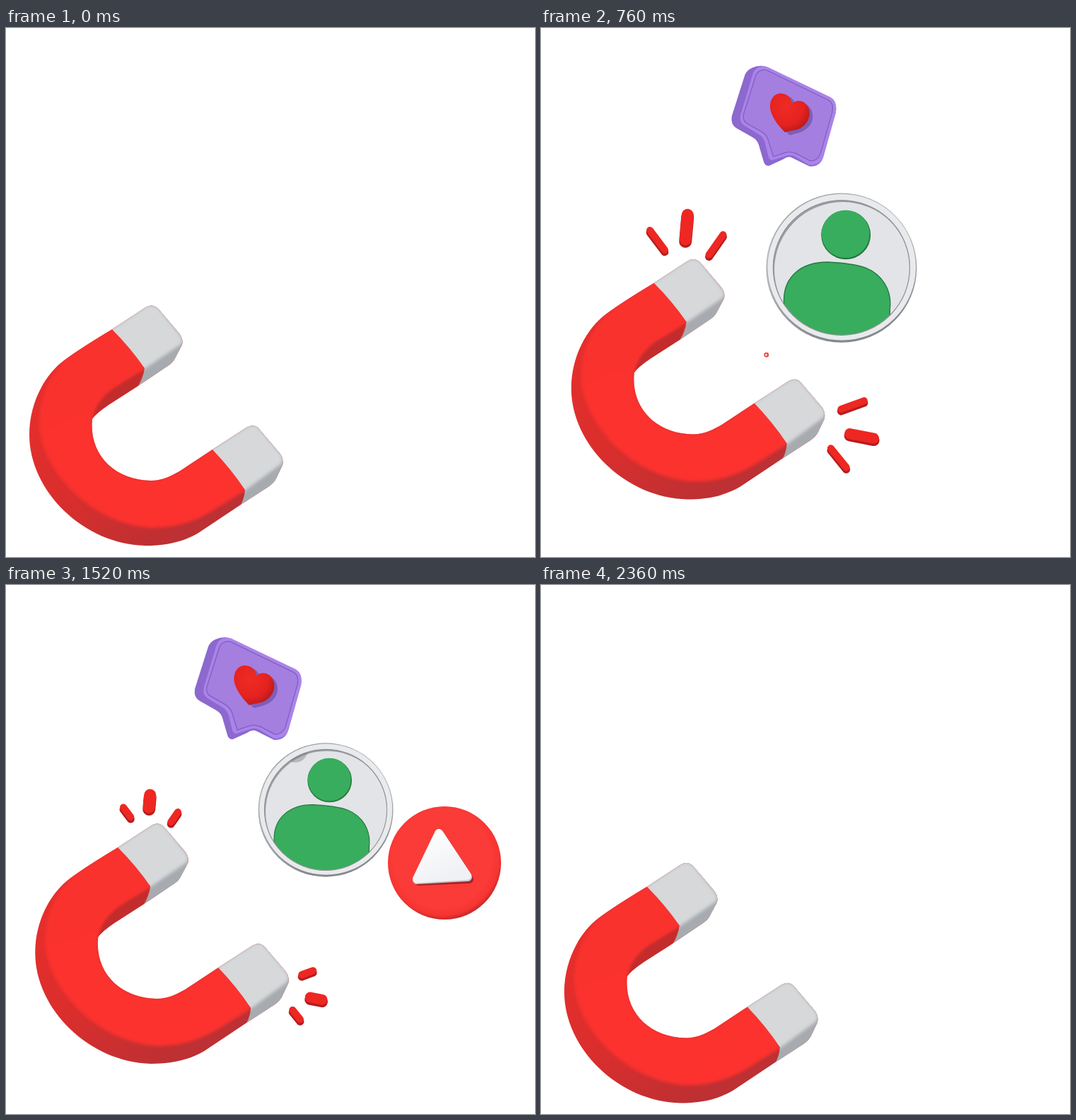
These frames come from a looping animation (748 px wide and 748 px high, 2400 ms). An HTML page:

```html
<!DOCTYPE html>
<html lang="en">
<head>
<meta charset="utf-8">
<title>Magnet</title>
<style>
  html, body { margin: 0; width: 100%; height: 100%; overflow: hidden; background: #fff; }
  svg { display: block; width: 100vw; height: 100vh; }
</style>
</head>
<body>
<svg viewBox="0 0 748 748">
  <defs>
    <path id="body" d="M206 392.5Q212 393 217 399L245 432Q251 440 249 448L239 467Q236 473 230 477L187 506L145 533Q127 545 122 553C117 602 152 639 205 640C222 640 234 633 245 627L292 596L340 565Q350 559 357 566L386 600Q393 608 391 618L382 637Q379 643 372 648L332 674L272 714C250 727 225 732 197 732C110 730 33 655 33 575C33 530 55 490 82 470Q105 453 150 426L196 396Q201 392 206 392.5Z"/>
    <path id="front" d="M206 392.5Q212 393 217 399L246 435Q251 442 246 447L196 481L160 503C140 514 126 529 121 552C117 602 152 639 205 640C222 640 234 633 245 627L292 596L340 565Q350 559 357 566L388 603Q393 611 387 617L338 653L290 683C262 700 235 706 205 706C120 700 50 625 48 560C48 520 66 485 92 464Q110 451 150 426L196 396Q201 392 206 392.5Z"/>
    <path id="bubbleShape" d="M296 118Q301 118 306 120L396 163Q407 169 404 186L386 250Q381 264 366 263L340 250Q334 248 328 253L308 262Q302 263 300 256L293 232Q291 225 284 221L261 208Q252 203 254 191L273 131Q276 124 283 121Q289 118 296 118Z"/>
    <clipPath id="bodyClip"><use href="#body"/></clipPath>
    <clipPath id="poles"><path d="M150 426Q176 452 196 481Q194 495 187 506L260 520V380H150ZM292 596Q318 623 338 653Q337 665 332 674L400 700V540H292Z"/></clipPath>
    <clipPath id="disc"><ellipse cx="447" cy="299" rx="107" ry="105.5"/></clipPath>
    <clipPath id="shadeClip"><ellipse id="shadeDisc" cx="447" cy="299" rx="107" ry="105.5"/></clipPath>
    <filter id="soft"><feGaussianBlur stdDeviation="2.2"/></filter>
    <linearGradient id="redSide" gradientUnits="userSpaceOnUse" x1="60" y1="500" x2="210" y2="735">
      <stop offset="0" stop-color="#e62f2c"/><stop offset=".55" stop-color="#d92e2d"/><stop offset="1" stop-color="#bd3033"/>
    </linearGradient>
    <linearGradient id="redFront" gradientUnits="userSpaceOnUse" x1="120" y1="440" x2="230" y2="700">
      <stop offset="0" stop-color="#f9312d"/><stop offset="1" stop-color="#fd332f"/>
    </linearGradient>
    <linearGradient id="ring" x2=".35" y2="1">
      <stop offset="0" stop-color="#8f9398"/><stop offset=".4" stop-color="#b9bcc0"/><stop offset="1" stop-color="#84888d"/>
    </linearGradient>
    <radialGradient id="ball" cx=".48" cy=".46" r=".54">
      <stop offset="0" stop-color="#f93a37"/><stop offset=".8" stop-color="#fb3b38"/><stop offset=".93" stop-color="#f63431"/><stop offset="1" stop-color="#c9282a"/>
    </radialGradient>
    <radialGradient id="heart" cx=".4" cy=".35" r=".7">
      <stop offset="0" stop-color="#f02b25"/><stop offset=".65" stop-color="#e4221f"/><stop offset="1" stop-color="#b4181c"/>
    </radialGradient>
    <linearGradient id="white" x2=".5" y2="1">
      <stop offset="0" stop-color="#fff"/><stop offset="1" stop-color="#f0f1f5"/>
    </linearGradient>
  </defs>

  <g id="profile"><g transform="translate(-447 -299)">
    <ellipse cx="447" cy="299" rx="118" ry="117" fill="url(#ring)"/>
    <ellipse cx="447.5" cy="298" rx="111.5" ry="110" fill="none" stroke="#e9eaec" stroke-width="9"/>
    <g clip-path="url(#disc)">
      <rect x="330" y="180" width="240" height="240" fill="#9b9da2"/>
      <ellipse cx="449" cy="302" rx="107" ry="106" fill="#e3e4e8"/>
      <g fill="#38ad5d" stroke="#26783f" stroke-width="1.5">
        <path d="M357 354C355 312 385 290 425 290C450 291 470 294 485 299C512 310 526 335 523 362L522 410H357Z"/>
        <ellipse cx="454" cy="247.500" rx="38" ry="37.500" fill="#23763d"/>
        <circle cx="453.500" cy="246" r="37.500" stroke="none"/>
      </g>
    </g>
    <ellipse cx="447" cy="299" rx="107" ry="105.5" fill="none" stroke="#8e9196" stroke-width="1.3"/>
  </g></g>

  <g clip-path="url(#shadeClip)"><g id="shade"><use href="#bubbleShape" transform="translate(-302.5 -158)" fill="#77797e" opacity=".42"/></g></g>

  <g id="bubble"><g transform="translate(-329.5 -190)">
    <use href="#bubbleShape" fill="#8c68cf"/>
    <path d="M298 119Q302 118 306 120L396 163Q407 169 404 186L386 249Q381 262 366 261L346 249Q339 245 332 248L313 254Q309 255 307 249L302 229Q300 221 293 217L272 204Q264 199 267 188L285 128Q289 119 298 119Z" fill="#aa84ea"/>
    <path d="M299 124Q302 123 306 125L393 167Q402 172 399 185L382 245Q377 256 367 255L348 245Q340 241 332 243L314 249L307 226Q305 218 297 213L276 201Q269 197 271 188L289 131Q292 125 299 124Z" fill="#a47fe0" stroke="#8663c5" stroke-width="1.5"/>
    <path d="M332 216C325 207 315 196 312 183C309 168 319 158 329 160C337 162 341 167 342 174C350 169 359 171 364 179C371 192 365 205 353 211C347 214 340 215 335 217Z" fill="#68489f" opacity=".6" transform="translate(4 1)"/>
    <path d="M331 214C324 207 313 195 310 182C307 166 317 156 327 158C335 159 340 164 341 172C349 166 359 168 364 177C370 189 364 202 353 208C345 212 338 211 331 214Z" fill="url(#heart)"/>
  </g></g>

  <g id="play"><g transform="translate(-610 -434)">
    <circle cx="610" cy="434" r="80" fill="url(#ball)"/>
    <g stroke-width="12" stroke-linejoin="round">
      <path d="M605 396L574 460L645 457Z" fill="#a92327" stroke="#a92327"/>
      <path d="M603 393L571 458L643 454Z" fill="#c5c7cc" stroke="#c5c7cc"/>
      <path d="M602 392L571 456.500L642 452Z" fill="url(#white)" stroke="url(#white)"/>
    </g>
  </g></g>

  <g id="magnet">
    <use href="#body" fill="url(#redSide)"/>
    <g clip-path="url(#bodyClip)">
      <path d="M196 481L160 503C140 514 126 529 121 552L145 533L187 506Z" fill="#c32c2c"/>
      <use href="#front" fill="url(#redFront)" stroke="#f9322e" stroke-width="2" filter="url(#soft)"/>
    </g>
    <g clip-path="url(#poles)">
      <use href="#body" fill="#a7abaf"/>
      <g clip-path="url(#bodyClip)"><use href="#front" fill="#d6d8da" stroke="#d2d4d6" stroke-width="2" filter="url(#soft)"/></g>
    </g>
    <g id="ticks" transform="translate(-8 55)" stroke-linecap="round"></g>
  </g>
</svg>

<script>
const LOOP = 2400, STEP = 40;
const $ = id => document.getElementById(id);

// rows: time, then values
const tracks = {
  magnet: [[0, 0], [220, 15], [520, -46], [720, -66], [1000, -44], [1120, -1], [1210, 11], [1320, -5],
    [1520, -55], [1640, -64], [1960, -11], [2120, 11], [2280, 7], [2360, .6], [2400, 0]],
  profile: [[120, 250, 520, 0], [520, 447, 299, 236], [560, 449, 289, 239], [1000, 393, 405, 179],
    [1320, 453, 326, 179], [1520, 452, 318, 191], [1640, 445, 326, 190], [1900, 290, 460, 0]],
  bubble: [[360, 250, 430, 0], [520, 271, 292, 84], [800, 347, 118, 150], [1000, 338.5, 162, 142],
    [1240, 328, 194, 150], [1320, 329.5, 190, 151], [1520, 342.5, 146, 151], [1600, 344, 139, 151],
    [1720, 339, 153, 150], [1960, 277, 400, 12], [2000, 268, 425, 0]],
  play: [[720, 300, 470, 0], [1000, 640, 314, 143], [1080, 641, 306, 157], [1160, 638, 318, 160],
    [1320, 610, 434, 160], [1380, 608, 440, 160], [1520, 620, 393, 160], [1720, 641, 310, 160],
    [1960, 474.5, 414.5, 158], [2160, 280, 520, 0]],
  // near and far ends of the spark lines
  sparks: [[580, 0, 0], [800, 6, 44], [1000, 10, 47], [1140, 47, 47], [1141, 0, 0],
    [1460, 0, 0], [1520, 0, 17], [1680, 8, 46], [1760, 12, 47], [1900, 47, 47]]
};

// start x, start y, direction in degrees, width
const sparks = [
  [176, 329, -127, 11], [202, 315, -85, 18], [233, 336, -55, 11],
  [418, 552, -20, 11], [430, 584, 11, 16], [405, 602, 51, 11]
];

const slope = (k, i, c) => (k[i + 1][c] - k[i][c]) / (k[i + 1][0] - k[i][0]);

function tangent(k, i, c) {
  if (i === 0 || i === k.length - 1) return 0;
  const a = slope(k, i - 1, c), b = slope(k, i, c);
  return a * b > 0 ? 2 * a * b / (a + b) : 0;
}

// monotone cubic through the rows
function sample(k, t) {
  const last = k.length - 1;
  if (t <= k[0][0]) return k[0].slice(1);
  if (t >= k[last][0]) return k[last].slice(1);
  let i = 0;
  while (t >= k[i + 1][0]) i++;
  const h = k[i + 1][0] - k[i][0], s = (t - k[i][0]) / h, r = 1 - s;
  return k[i].slice(1).map((v, n) => {
    const c = n + 1;
    return v * (1 + 2 * s) * r * r + k[i + 1][c] * s * s * (3 - 2 * s) +
      h * s * r * (r * tangent(k, i, c) - s * tangent(k, i + 1, c));
  });
}

function addLine(color, width, shift) {
  const el = document.createElementNS("http://www.w3.org/2000/svg", "line");
  el.setAttribute("stroke", color);
  el.setAttribute("stroke-width", width);
  el.setAttribute("transform", `translate(0 ${shift})`);
  $("ticks").append(el);
  return el;
}
const lines = sparks.map(s => [addLine("#b51d1f", s[3], 2), addLine("#ee2722", s[3] - 1, -1)]);

function place(id, [x, y, d], base) {
  $(id).setAttribute("transform", `translate(${x} ${y}) scale(${d / base})`);
  $(id).style.display = d > .5 ? "" : "none";
}

function draw(t) {
  const [lift] = sample(tracks.magnet, t);
  $("magnet").setAttribute("transform", `translate(${-.15 * lift} ${lift})`);

  const face = sample(tracks.profile, t), bubble = sample(tracks.bubble, t);
  place("profile", face, 236);
  place("bubble", bubble, 151);
  place("shade", face[2] > 1 ? bubble : [0, 0, 0], 151);
  place("play", sample(tracks.play, t), 160);
  $("shadeDisc").setAttribute("transform",
    `translate(${face[0]} ${face[1]}) scale(${face[2] / 236}) translate(-447 -299)`);

  const [near, far] = sample(tracks.sparks, t);
  $("ticks").style.display = far - near > 1 ? "" : "none";
  sparks.forEach(([x, y, deg], i) => {
    const a = deg * Math.PI / 180, dx = Math.cos(a), dy = Math.sin(a);
    const ends = { x1: x + dx * near, y1: y + dy * near, x2: x + dx * far, y2: y + dy * far };
    for (const el of lines[i]) for (const key in ends) el.setAttribute(key, ends[key]);
  });
}

function tick() {
  draw(Math.floor(performance.now() / STEP) * STEP % LOOP);
  requestAnimationFrame(tick);
}
tick();
</script>
</body>
</html>
```
